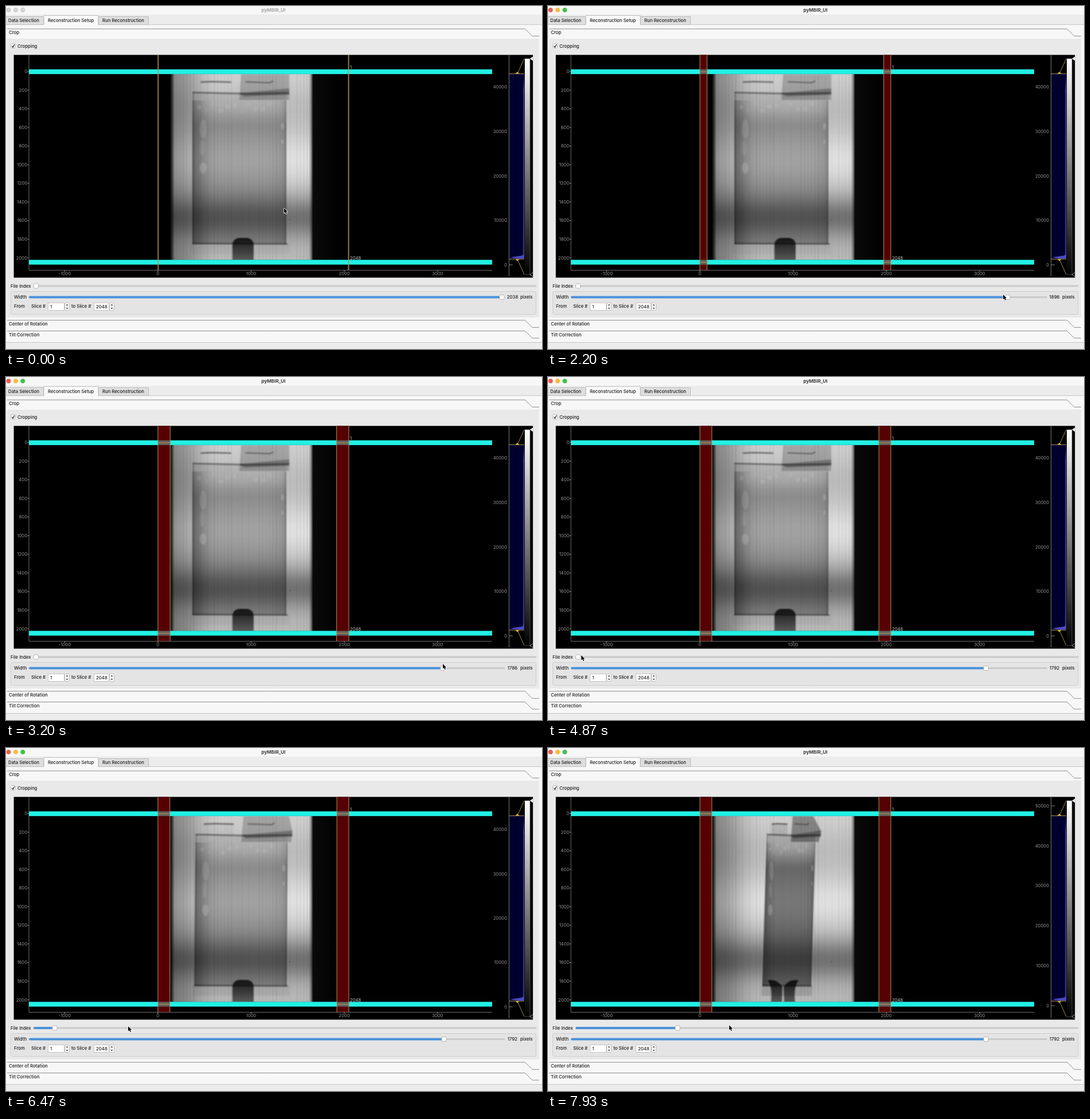
An HTML page with a canvas that plays this animation: 935 px wide and 599 px high, repeating every 8 s.

```html
<!DOCTYPE html>
<html lang="en">
<head>
<meta charset="utf-8">
<title>pyMBIR_UI</title>
<style>
html, body { margin: 0; width: 100%; height: 100%; overflow: hidden; background: #f7f7f7; }
canvas { display: block; }
</style>
</head>
<body>
<canvas id="stage" width="935" height="599"></canvas>
<script>
const c = document.getElementById('stage').getContext('2d');
const LOOP = 8000, SCALE = 0.1626, GOLD = '#b09558', TICK = '#969696', SMALL = '400 7.7px';
const TOP = 110.6, BOTTOM = 443.3, BAR = 8.3;

// Key points: time, value, value
const cursorKeys = [[70, 485, 353], [250, 452, 323], [800, 867, 514], [1270, 864, 505], [1600, 864, 505],
  [2200, 794, 504], [3200, 762, 501], [3600, 762, 501], [3770, 350, 528], [3930, 19, 505], [4400, 53, 486],
  [4810, 53, 486], [4870, 58, 486], [5670, 147, 486], [5870, 147, 486], [6470, 213, 486], [7930, 316, 484]];
const widthKeys = [[1600, 2038, 865], [2200, 1896, 802], [3200, 1786, 762], [4070, 1786, 762], [4130, 1792, 764]];
const fileKeys = [[5900, 52.5], [6400, 85], [6730, 85], [7900, 226]];

function track(t, keys) {
  const i = keys.findIndex(k => k[0] > t);
  if (i < 1) return keys.at(i).slice(1);
  const a = keys[i - 1], b = keys[i], f = (t - a[0]) / (b[0] - a[0]);
  return a.slice(1).map((v, j) => v + (b[j + 1] - v) * f);
}

const clamp = v => Math.max(0, Math.min(1, v));
const smooth = v => (v = clamp(v)) * v * (3 - 2 * v);
const bell = (v, mid, width) => Math.exp(-(((v - mid) / width) ** 2));
const grey = (v, a = 1) => `rgba(${v},${v},${v},${a})`;

function rect(x, y, w, h, fill) { c.fillStyle = fill; c.fillRect(x, y, w, h); }

function line(points, color, width = 1) {
  c.beginPath();
  points.forEach(p => c.lineTo(...p));
  c.strokeStyle = color; c.lineWidth = width; c.stroke();
}

function poly(points, fill) {
  c.beginPath();
  points.forEach(p => c.lineTo(...p));
  c.closePath(); c.fillStyle = fill; c.fill();
}

function oval(x, y, rx, ry, fill) {
  c.beginPath(); c.ellipse(x, y, rx, ry, 0, 0, 7); c.fillStyle = fill; c.fill();
}

function box(x, y, w, h, r, fill, stroke) {
  c.beginPath(); c.roundRect(x, y, w, h, r);
  c.fillStyle = fill; c.fill();
  if (stroke) { c.strokeStyle = stroke; c.lineWidth = 1; c.stroke(); }
}

function text(s, x, y, color = '#1c1c1c', align = 'left', font = '500 7.8px') {
  c.font = font + ' Inter, sans-serif';
  c.textAlign = align; c.textBaseline = 'middle'; c.fillStyle = color;
  c.fillText(s, x, y + 0.5);
}

// Gradient sampled from a function of 0..1 that returns a colour
function ramp(x0, y0, x1, y1, shade, steps = 64) {
  const g = c.createLinearGradient(x0, y0, x1, y1);
  for (let i = 0; i <= steps; i++) g.addColorStop(i / steps, shade(i / steps));
  return g;
}

function slider(x0, x1, y, x) {
  box(x0, y - 1, x1 - x0, 2, 1, '#cfcfcf', '#c6c6c6');
  if (x > x0 + 5) box(x0, y - 2, x - x0, 4, 2, '#4a90da');
  box(x - 4, y - 4, 8, 8, 2, '#fff', '#b4b4b4');
}

function spin(x, w, y, s) {
  box(x + .5, y - 6.5, w - 1, 13, 0, '#fff', '#c4c4c4');
  text(s, x + 4, y);
  box(x + w + .5, y - 6.5, 8, 13, 2, '#fafafa', '#bdbdbd');
  const m = x + w + 4.5;
  [-1, 1].forEach(s => poly([[m - 2, y + 2 * s], [m, y + 4.5 * s], [m + 2, y + 2 * s]], '#444'));
}

function section(s, y) {
  line([[2, y], [905.5, y], [918, y + 12.5], [930, y + 12.5]], '#8c8c8c');
  text(s, 5, y + 6.2);
}

function chrome(active) {
  rect(0, 0, 935, 599, '#f7f7f7');
  ['#ee5b50', '#f5bd3c', '#3fc04c'].forEach((color, i) =>
    box(.9 + i * 12.4, 3.4, 7.2, 7.2, 3.6, active ? color : '#d6d6d6', active ? color : '#c4c4c4'));
  text('pyMBIR_UI', 466.5, 6.8, active ? '#3c3c3c' : '#a4a4a4', 'center', '700 8.1px');
  rect(0, 15, 935, 18, '#ececec');
  line([[0, 32.5], [935, 32.5]], '#c8c8c8');
  box(-.5, 18.5, 66, 14, 0, '#dedede', '#bcbcbc');
  box(161.5, 18.5, 87, 14, 0, '#dedede', '#bcbcbc');
  rect(66, 16, 95, 18, '#f9f9f9');
  line([[66, 33], [66, 16.5], [161, 16.5], [161, 33]], '#c0c0c0');
  text('Data Selection', 4, 25.3);
  text('Reconstruction Setup', 73, 25);
  text('Run Reconstruction', 168, 25.3);
  section('Crop', 40);
  rect(2, 57, 928, 487, '#e9e9e9');
  section('Center of Rotation', 548.8);
  section('Tilt Correction', 567.5);
  rect(0, 587, 935, 12, '#ececec');
  line([[0, 587.5], [935, 587.5]], '#c6c6c6');
  box(8.5, 65.5, 8, 8, 2, '#fff', '#b8b8b8');
  line([[10.3, 69.8], [12, 72], [15, 67]], '#222', 1.3);
  text('Cropping', 20, 69.7);
}

// Uneven beam: bright and dim bands, darker to the left, soft edges
function beam() {
  rect(286, 119, 250, 325, ramp(0, 119, 0, 444, f =>
    grey(185 + 20 * bell(f, 0, .12) + 38 * bell(f, .46, .15) - 72 * bell(f, .77, .11))));
  c.globalCompositeOperation = 'multiply';
  rect(286, 119, 250, 325, ramp(286, 0, 536, 0, f =>
    grey(255 * (.66 + .34 * smooth(f / .35)) * smooth(f / .035) * smooth((1 - f) / .025))));
  for (let x = 290; x < 532; x += 6) rect(x, 119, 3, 325, grey(120, .04 + .04 * Math.sin(x * x)));
}

function stand(split) {
  const fade = ramp(0, 405, 0, 443, f => grey(45 + 75 * f), 2);
  c.globalAlpha = 1 - split;
  box(395, 405, 37, 50, [12, 12, 0, 0], fade);
  c.globalAlpha = split;
  [-1, 1].forEach(s => {
    const x = d => 410 + s * d;
    c.beginPath();
    c.moveTo(x(27), 406); c.quadraticCurveTo(x(11), 402, x(1), 417);
    c.lineTo(x(2), 445); c.lineTo(x(21), 445);
    c.quadraticCurveTo(x(18), 417, x(27), 406);
    c.fillStyle = fade; c.fill();
  });
  c.globalAlpha = 1;
}

// Flat cell turning on its axis; the beam path grows with 1 / cos
function radiograph(p) {
  const angle = p * 1.03, cos = Math.cos(angle), sin = Math.sin(angle);
  const X = (u, y) => 407 + 82 * u * cos + sin * (20 - 9 * (y - 150) / 266);
  const quad = (u0, y0, u1, y1) => [[X(u0, y0), y0], [X(u1, y0), y0], [X(u1, y1), y1], [X(u0, y1), y1]];
  const path = (points, color, width) => line(points.map(([u, y]) => [X(u, y), y]), color, width);
  const through = t => Math.round(255 * t ** (1 / cos));

  c.save();
  rect(533, 119, 50, 324, ramp(533, 0, 583, 0, f => grey(10 * (1 - f)), 2));
  c.beginPath(); c.rect(286, 119, 250, 324.5); c.clip();
  beam();
  c.filter = 'blur(0.8px)';
  poly(quad(-1, 150, 1, 416), grey(through(.93)));
  poly(quad(-1, 165, 1, 416), ramp(0, 165, 0, 416, f => grey(through(.78), smooth(f * 5))));
  poly(quad(-1, 165, 1, 416), ramp(X(-1, 290), 0, X(1, 290), 0,
    f => grey(255 - 50 * bell(f, 0, .12) - 22 * bell(f, 1, .1))));
  path([[-.98, 152], [-.98, 415]], grey(80, .4), 1.5);
  path([[.98, 165], [.98, 416]], grey(80, .4), 1.5);
  path([[-1, 414.5], [1.03, 415.5]], grey(80, .55), 2.5);
  poly(quad(-1.04, 416, 1.06, 433), grey(190, .15 + .4 * sin));

  // Tabs and tape
  poly(quad(-.82, 132, -.15, 152), grey(190, .5 * sin));
  path([[-.82, 133], [-.6, 132], [-.17, 133]], grey(60, .6), 2.5);
  path([[.13, 132.5], [.65, 134], [.72, 131]], grey(70, .55), 2);
  const tape = 1.06 + .2 * sin;
  poly([[X(.04, 119), 119], [X(tape - .4 * sin, 119), 119], [X(tape, 145), 145], [X(tape - .1 * sin, 164), 164], [X(0, 164), 164]],
    grey(through(.8)));
  poly([[X(0, 152), 152], [X(tape, 144), 144], [X(tape, 155), 155], [X(.1, 158), 158]], grey(140, .6));
  path([[-1, 151], [.2, 153.5], [tape, 152]], grey(80, .6), 2.5);
  stand(smooth(sin * sin / .73));

  // Bubbles
  c.globalCompositeOperation = 'source-over';
  const bubble = (u, y, rx, ry, a) => oval(X(u, y), y, rx * (.3 + .7 * cos), ry, grey(205, a));
  bubble(-.77, 283, 6, 10, .28);
  bubble(-.77, 215, 6, 17, .2);
  bubble(-.79, 248, 4, 14, .15);
  bubble(.92, 210, 3, 6, .3);
  bubble(.92, 237, 1.8, 4, .3);
  for (let i = 0; i < 12; i++) bubble(-.85 + i * .15, 177 + 7 * Math.sin(i * 2.4), 3 + 2 * Math.sin(i * 5), 4, .2);
  c.filter = 'none';
  oval(495, 373, .8, .8, '#333');
  c.restore();
}

function cropBand(x, w) {
  if (w > 2) {
    rect(x, 85.5, w, 375.5, '#560003');
    [TOP, BOTTOM].forEach(y => {
      rect(x, y, w, BAR, '#66605c');
      line([[x, y + 4.2], [x + w, y + 4.2]], GOLD);
    });
  }
  [x, x + w].forEach(v => line([[v, 85.5], [v, 461]], GOLD));
}

function plot(width, p) {
  rect(13.6, 85.4, 905.6, 389, '#000');
  radiograph(p);
  line([[40, 85.5], [40, 461.5], [848, 461.5]], '#6c6c6c');
  for (let v = 0; v <= 2000; v += 200) {
    const y = 114.5 + v * SCALE;
    line([[37.5, y], [40, y]], TICK);
    text(v, 37, y, TICK, 'right', SMALL);
  }
  for (let v = -1000; v <= 3000; v += 1000) {
    const x = 265 + v * SCALE;
    line([[x, 461], [x, 464]], TICK);
    text(v, x, 467.2, TICK, 'center', SMALL);
  }
  [TOP, BOTTOM].forEach(y => rect(40, y, 808, BAR, '#22f0e4'));
  const w = (2048 - width) / 2 * SCALE;
  cropBand(265, w);
  cropBand(598 - w, w);
  text('1', 600, 107, '#c8c8c8', 'left', SMALL);
  text('2048', 600, 440, '#c8c8c8', 'left', SMALL);
  histogram(p);
}

function histogram(p) {
  const top = 118.3, zero = 452 - 2 * p * p, step = 77.6 - 7.8 * p * p;
  line([[877.5, 85.5], [877.5, 472]], '#777');
  for (let i = 0; zero - i * step > 95; i++) {
    const y = zero - i * step;
    line([[877, y], [884, y]], '#888');
    text(i * 10000, 874, y, TICK, 'right', SMALL);
  }
  rect(878, top, 26, 442 - top, '#00002e');
  const counts = [[904, top]];
  for (let y = 150; y <= 441; y++) counts.push([902.5 + .5 * Math.sin(y * 3) - 22 * bell(y, 439, 2.2), y]);
  poly([...counts, [904, 441]], '#4b4bc4');
  [[top, 92, -1], [442, 469, 1]].forEach(([y, end, s]) => {
    line([[877, y], [904, y]], GOLD);
    line([[904, end], [892, y]], '#a08a4c');
    poly([[888.5, y], [892, y + 3.5 * s], [895.5, y]], '#d8b440');
  });
  rect(905, 92, 9, 377, ramp(0, 92, 0, 469, f => grey(255 * (1 - f)), 1));
  line([[905, 92], [914, 92], [914, 469], [905, 469]], '#777', .6);
  poly([[914, 92], [919, 88.5], [919, 95.5]], '#fff');
  line([[919, 465.5], [914, 469], [919, 472.5]], '#bbb', .8);
}

function controls(width, widthX, fileX) {
  text('File Index', 8, 489);
  slider(48, 925, 489, fileX);
  box(8.5, 498.5, 916, 40, 2, '#e4e4e4', '#cdcdcd');
  text('Width', 14, 508.5);
  slider(40, 870, 508.5, widthX);
  text(Math.round(width), 883.5, 508.5, undefined, 'center');
  text('pixels', 897, 508.5);
  text('From', 14, 524.6);
  text('Slice #', 44, 524.6);
  spin(73, 29, 525, '1');
  text('to Slice #', 114, 524.6);
  spin(153, 27, 525, '2048');
}

function pointer(x, y) {
  c.save();
  c.translate(x, y);
  c.lineJoin = 'round';
  const arrow = [[0, 0], [0, 8.6], [2, 6.8], [3.4, 10], [4.9, 9.3], [3.5, 6.2], [6.2, 6.2], [0, 0]];
  line(arrow, '#fff', 1.5);
  poly(arrow, '#000');
  c.restore();
}

function draw() {
  const t = performance.now() % LOOP;
  const [width, widthX] = track(t, widthKeys), [fileX] = track(t, fileKeys);
  chrome(t >= 1600);
  plot(width, (fileX - 52.5) / 173.5);
  controls(width, widthX, fileX);
  pointer(...track(t, cursorKeys));
  requestAnimationFrame(draw);
}
draw();
</script>
</body>
</html>
```
